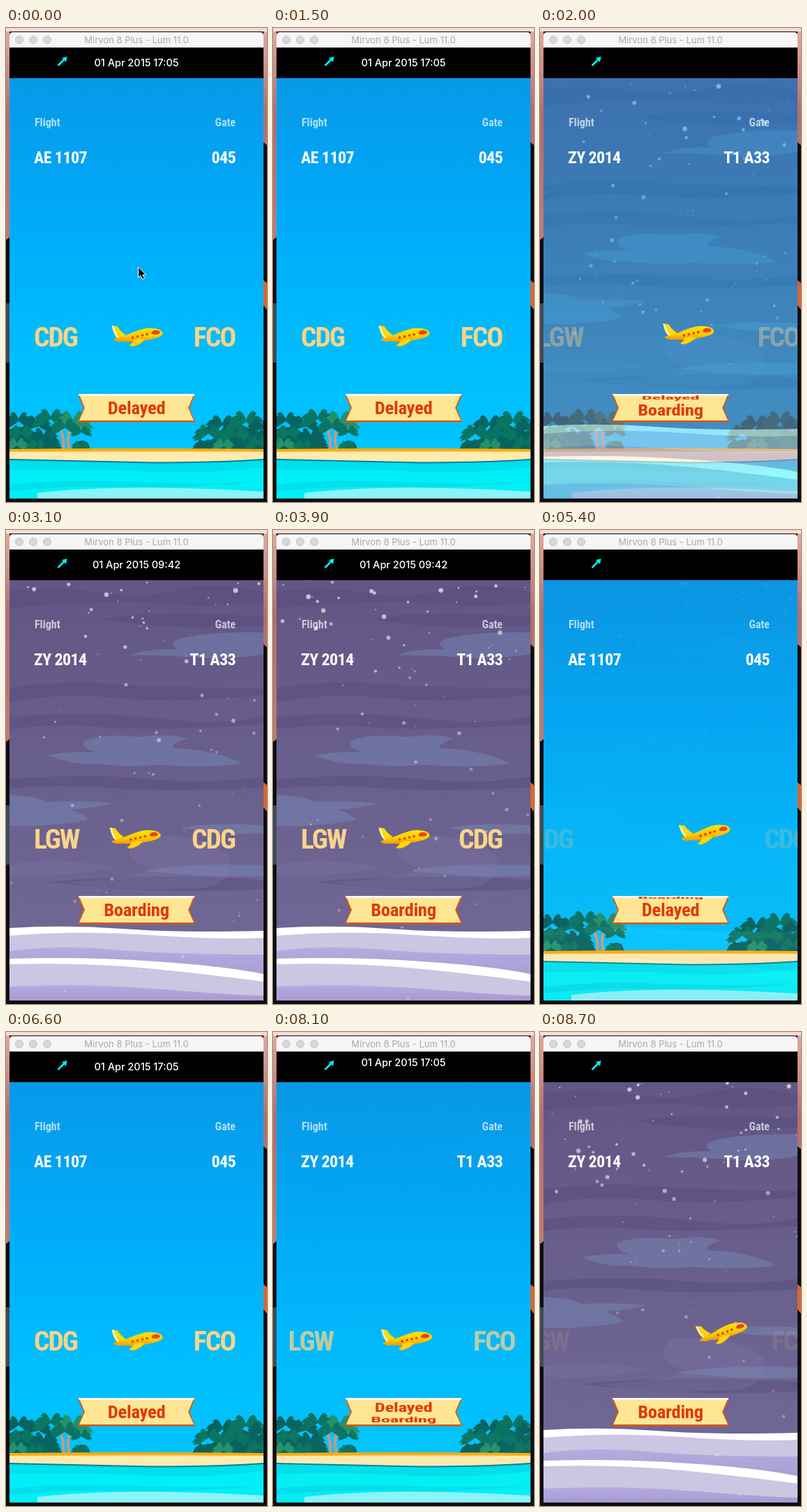
Animation, 374 px wide and 680 px high, one loop 8800 ms. Source, as an HTML page:

```html
<!DOCTYPE html>
<html lang="en">
<head>
<meta charset="utf-8">
<title>Flight status</title>
<style>
  html, body { margin: 0; width: 100%; height: 100%; overflow: hidden; background: #0a0a0e; }
  svg { display: block; width: 374px; height: 680px; }
  text { font-family: "Roboto Condensed", Roboto, "Liberation Sans", sans-serif; font-stretch: 75%; font-weight: 700; }
  .end { text-anchor: end; }
  .caption { font-size: 16px; fill: #fff; fill-opacity: .68; }
  .code { font-size: 24px; letter-spacing: -.6px; fill: #fff; }
  .airport { font-size: 39.500px; letter-spacing: -2px; fill: #fad488; }
  .status { font-size: 26.500px; letter-spacing: -.2px; fill: #e03a06; text-anchor: middle; }
  .clock { font: 500 14.500px Inter, sans-serif; fill: #fff; text-anchor: middle; }
  .title { font: 400 13px Inter, sans-serif; fill: #a9a8ad; text-anchor: middle; }
</style>
</head>
<body>
<svg viewBox="0 0 374 680">
  <defs>
    <linearGradient id="sky" x2="0" y2="1">
      <stop stop-color="#0799e8"/><stop offset=".35" stop-color="#00a9f7"/>
      <stop offset=".7" stop-color="#00bbfe"/><stop offset="1" stop-color="#00c5ff"/>
    </linearGradient>
    <linearGradient id="dusk" x2="0" y2="1">
      <stop stop-color="#625684"/><stop offset=".5" stop-color="#6a608d"/><stop offset="1" stop-color="#736a98"/>
    </linearGradient>
    <linearGradient id="wall" x2="0" y2="1">
      <stop stop-color="#e3aaa2"/><stop offset=".4" stop-color="#b46d6d"/><stop offset="1" stop-color="#c27b70"/>
    </linearGradient>
    <linearGradient id="gold" x2="0" y2="1">
      <stop stop-color="#ffe20c"/><stop offset=".6" stop-color="#ffc900"/><stop offset="1" stop-color="#f39a00"/>
    </linearGradient>
    <linearGradient id="lilac" x2="0" y2="1">
      <stop stop-color="#b5abdf"/><stop offset="1" stop-color="#a79ad0"/>
    </linearGradient>
    <clipPath id="screen"><path d="M5 72h364v603H5z"/></clipPath>
    <clipPath id="bar"><path d="M5 28h364v44H5z"/></clipPath>
  </defs>

  <!-- desktop and window chrome -->
  <path fill="#0c0d13" d="M0 0h374v680H0z"/>
  <path fill="url(#wall)" d="M0 0h5v300l-5 4zM369 0h5v168l-5 -4z"/>
  <path fill="#f9dbd4" d="M0 0h374v5H0z"/>
  <path fill="#3d4a58" d="M0 395h5v85H0z"/>
  <path fill="#d9662f" d="M369 362l5 4v38l-5 -6z"/>
  <path fill="#f6f6f7" d="M5 28V11q0-5 5-5h354q5 0 5 5v17z"/>
  <g fill="#d8d8da" stroke="#c4c4c7"><circle cx="19" cy="17" r="5.5"/><circle cx="39" cy="17" r="5.5"/><circle cx="59" cy="17" r="5.5"/></g>
  <text class="title" x="187" y="22">Mirvon 8 Plus - Lum 11.0</text>

  <g clip-path="url(#screen)">
    <path fill="url(#sky)" d="M5 72h364v535H5z"/>
    <g id="palms"></g>
    <path fill="#ffae0d" d="M5 604q180 -2 364 0v8H5z"/>
    <path fill="#ffebb0" d="M5 608q180 -1 364 0v16H5z"/>
    <path fill="#087f96" d="M5 618q90 2 180 4t184 -4v10H5z"/>
    <path fill="#00dfec" d="M5 620q90 2 180 4t184 -4v55H5z"/>
    <path fill="#00eff6" d="M5 634q110 -3 190 2t174 -6v45H5z"/>
    <path fill="#00dfec" d="M5 655q80 -8 170 -4t194 0q-100 9 -180 7t-184 6z"/>
    <path fill="#8af4fa" d="M45 667q120 -14 324 -2v10H45z"/>

    <g id="winter">
      <path fill="url(#dusk)" d="M5 72h364v603H5z"/>
      <g fill="#554a7b" opacity=".45">
        <path d="M5 88q70 -8 130 2t110 -4 124 4v14q-70 9 -140 2t-224 6zM5 226q90 -14 190 -2l174 4v9q-130 12 -210 4t-154 6z"/>
        <path d="M140 128q60 -14 229 -4v12q-120 10 -229 -8zM5 268q110 -10 210 2t154 -4v13q-160 10 -230 4t-134 3zM5 357q120 -8 200 0t164 -3v15q-130 8 -220 1t-144 2zM60 505q140 -14 309 -3v13q-140 10 -309 -10z"/>
      </g>
      <g fill="#7890bd" opacity=".42">
        <path d="M178 180q20 -10 68 -9q-14 -8 0 -14q38 -12 123 -10v31q-50 9 -98 5t-93 -3z"/>
        <path d="M112 302q30 -11 78 -5 48 -6 68 2q-24 9 -18 14 60 2 99 22q-46 7 -120 2 -60 4 -95 -3 15 -9 38 -11 -60 -4 -50 -21z"/>
        <path d="M60 323q50 -9 110 0 35 4 58 1 -36 14 -90 10 -40 6 -78 -11zM5 380q40 2 54 10 54 -2 94 2 -30 8 -62 9 20 5 28 15 -60 11 -114 8z"/>
        <path d="M195 489q60 -12 174 -8v15q-60 4 -174 -7zM250 427q50 -8 119 -3v11q-60 3 -119 -8z"/>
      </g>
      <path fill="#8a82b0" opacity=".22" d="M190 440q90 -8 130 28 10 36 -36 45 -120 8 -200 -8 100 -4 130 -20 -60 -12 -24 -45zM5 480q70 -12 150 4 -80 16 -150 10z"/>
      <path fill="#fff" d="M5 571q80 -5 160 1t204 3v100H5z"/>
      <path fill="#cbc6e1" d="M5 582q100 -8 200 -1t164 4v90H5z"/>
      <path fill="url(#lilac)" d="M5 604q70 -9 150 -2t214 7v40H5z"/>
      <path fill="#fff" d="M5 615q110 -3 210 4t154 18v38H5z"/>
      <path fill="#cbc6e1" d="M5 623q110 -3 200 6t164 19v27H5z"/>
      <path fill="url(#lilac)" d="M5 655q110 -5 220 4t144 9v7H5z"/>
      <g id="snow" fill="#fff"></g>
    </g>

    <text class="caption" x="41" y="141">Flight</text>
    <text class="caption end" x="329" y="141">Gate</text>
    <text class="code" id="flight" x="40" y="194"></text>
    <text class="code end" id="gate" x="329" y="194"></text>
    <text class="airport" id="departure" x="40" y="457"></text>
    <text class="airport end" id="arrival" x="328" y="457"></text>

    <g id="plane">
      <path fill="#f7a800" d="M-34 6q8 -5 18 -3l-3 5q-8 3 -15 -2z"/>
      <path fill="#ffd90a" d="M-36 -14l8 1q5 8 12 12l-10 6q-6 -3 -10 -19z"/>
      <path fill="#fff3a0" d="M-36 -14l3 .5q3 12 8 17l-2 1q-6 -4 -9 -18.500z"/>
      <path fill="url(#gold)" d="M-27 3C-12 0 2 -10 18 -10.500C30 -10.500 37 -7 37 -3C37 2 25 5 14 7C-2 10 -18 10 -26 7Q-29 5 -27 3z"/>
      <path fill="#e7440d" d="M21 -3.500q1 -4 7 -4 6 1 5 4 -3 3 -9 2 -3 0 -3 -2z"/>
      <g fill="#d9420c"><circle cx="-6" cy="3" r="1.800"/><circle cx="1" cy="1.500" r="1.800"/><circle cx="8" cy="0" r="1.800"/><circle cx="14.500" cy="-1.500" r="1.800"/></g>
      <path fill="#ffd60a" stroke="#f09a00" stroke-width=".7" d="M-5 6q9 -3 17 -1 -5 7 -16 10.500 -5 1 -7 -1 6 -4 6 -8.500z"/>
    </g>

    <path fill="#e0560f" d="M103 526h168l-8 19 8 20.500H103l8 -20.500z"/>
    <path fill="#ffe694" d="M105 526h164l-8 19 8 18H105l8 -18z"/>
    <path fill="#fff" d="M104 525h166v2.500H104z"/>
    <text class="status" id="oldStatus" y="9"></text>
    <text class="status" id="newStatus" y="9"></text>
  </g>

  <path d="M5 28h364v44H5z"/>
  <g stroke="#00eef0" fill="#00eef0"><path stroke-width="2.600" d="M74.500 54L84 44.500"/><path stroke="none" d="M80 43l7.500 -2 -1.500 8z"/></g>
  <g clip-path="url(#bar)"><text class="clock" id="clock" x="187"></text></g>
  <path id="cursor" stroke="#fff" d="M189.500 343v15l3.500 -3 2.500 5.500 2.800 -1.300 -2.500 -5.200h4.700z"/>
</svg>
<script>
const LOOP = 8800;
const PX = 364 / 414; // screen points to pixels
const el = Object.fromEntries([...document.querySelectorAll('[id]')].map(e => [e.id, e]));

const beach = { flight: 'AE 1107', gate: '045', from: 'CDG', to: 'FCO', status: 'Delayed', clock: '01 Apr 2015 17:05', winter: 0 };
const snowy = { flight: 'ZY 2014', gate: 'T1 A33', from: 'LGW', to: 'CDG', status: 'Boarding', clock: '01 Apr 2015 09:42', winter: 1 };
const changes = [
  { at: -9000, rate: 1, before: snowy, after: beach },
  { at: 1690, rate: 1, before: beach, after: snowy },
  { at: 4970, rate: 1, before: snowy, after: beach },
  { at: 7925, rate: .68, before: beach, after: snowy }
];

const clamp = v => Math.min(1, Math.max(0, v));
const span = (p, start, length) => clamp((p - start) / length);
const mix = (a, b, k) => a + (b - a) * k;

// CSS-style easing with control points (x1, 0) and (x2, 1)
function bezier(x1, x2) {
  return v => {
    v = clamp(v);
    let low = 0, high = 1;
    for (let i = 0; i < 20; i++) {
      const s = (low + high) / 2, r = 1 - s;
      if (3 * x1 * s * r * r + 3 * x2 * s * s * r + s ** 3 < v) low = s; else high = s;
    }
    return low * low * (3 - 2 * low);
  };
}
const easeInOut = bezier(.42, .58), easeOut = bezier(0, .58);

let seed = 11;
const random = () => (seed = seed * 16807 % 2147483647) / 2147483647;

function add(parent, tag, attributes) {
  const node = document.createElementNS('http://www.w3.org/2000/svg', tag);
  for (const name in attributes) node.setAttribute(name, attributes[name]);
  return parent.appendChild(node);
}

function palm(x, y, size, color) {
  let d = '';
  for (const degrees of [-205, -180, -150, -120, -60, -30, 0, 25]) {
    const a = degrees * Math.PI / 180, c = Math.cos(a), s = Math.sin(a);
    const tipX = x + size * c, tipY = y + size * (.45 * s + .45 * c * c);
    const midX = x + size * .55 * c, midY = y + size * .5 * s;
    d += `M${x} ${y}Q${midX} ${midY - size * .22} ${tipX} ${tipY}Q${midX} ${midY + size * .35} ${x} ${y + 3}z`;
  }
  add(el.palms, 'path', { d, fill: color });
}
const dark = '#07635f', green = '#0a7561', light = '#23926c';

// undergrowth and trunks, then crowns from back to front
add(el.palms, 'path', { fill: dark, d: 'M5 605V576q14 -8 30 2t32 4q8 10 10 23zM96 605q4 -14 14 -13t10 13zM267 605q4 -14 18 -13t24 -16 34 -4 26 0v33z' });
add(el.palms, 'path', { stroke: '#c69a80', 'stroke-width': 4, fill: 'none', d: 'M94 568q-8 16 -3 37M76 572q8 14 6 33' });
[
  [18, 561, 24, dark], [44, 566, 24, dark], [64, 558, 28, green], [96, 562, 30, light], [84, 570, 24, green],
  [22, 580, 24, green], [54, 584, 24, dark], [108, 577, 16, green],
  [310, 567, 28, dark], [344, 562, 30, green], [366, 570, 24, dark], [290, 579, 24, green], [328, 581, 26, green],
  [16, 596, 18, light], [44, 597, 17, green], [66, 597, 15, dark], [106, 598, 14, green],
  [284, 597, 17, dark], [312, 597, 19, light], [340, 596, 18, dark], [362, 594, 20, green]
].forEach(p => palm(...p));

const flakes = Array.from({ length: 95 }, () => {
  const size = .6 + 3 * random() ** 1.6;
  return {
    x: 5 + 364 * random(), birth: 4 * random(), size,
    vx: 50 * (random() - .5), vy: 20 + 90 * random(),
    node: add(el.snow, 'circle', { stroke: '#fff', 'stroke-opacity': .25, 'stroke-width': 1.5 })
  };
});

function drawSnow(seconds) {
  for (const f of flakes) {
    const age = (seconds + f.birth) % 4;
    f.node.setAttribute('cx', f.x + f.vx * age + 4 * age * age);
    f.node.setAttribute('cy', 66 + f.vy * age + 18 * age * age);
    f.node.setAttribute('r', Math.max(.4, f.size * (1 - .1 * age)));
    f.node.setAttribute('opacity', .7 - .12 * age);
  }
}

function drawPlane(s) {
  const p = easeInOut(s / 1.5);
  const roll = span(p, 0, .25), climb = span(p, .25, .25), land = span(p, .55, .45);
  const gone = p >= .51;
  const x = gone ? mix(5, 187.5, land) : 187.5 + PX * (80 * roll + 100 * climb);
  const y = gone ? 441 : 441 - PX * (10 * roll + 50 * climb);
  const angle = gone ? 0 : -22.5 * span(p, .1, .4);
  el.plane.setAttribute('transform', `translate(${x} ${y}) rotate(${angle})`);
  el.plane.setAttribute('opacity', gone ? land : 1 - climb);
}

function drawStatus(node, text, shift, scale) {
  node.textContent = text;
  node.setAttribute('transform', `translate(187 ${545 + shift}) scale(1 ${scale})`);
  node.setAttribute('visibility', scale > .101 ? 'visible' : 'hidden');
}

function drawLabels(s, before, after) {
  const turn = .72;
  const away = s < turn ? easeOut(s / turn) : 1 - easeOut((s - turn) / .5);
  el.departure.textContent = after.from;
  el.arrival.textContent = s < turn ? before.to : after.to;
  el.departure.setAttribute('transform', `translate(${-80 * PX * away})`);
  el.arrival.setAttribute('transform', `translate(${80 * PX * away})`);
  for (const label of [el.departure, el.arrival]) label.setAttribute('opacity', 1 - away);
}

function draw(t) {
  const { at, rate, before, after } = changes.findLast(c => c.at <= t);
  const s = (t - at) / 1000 * rate;

  el.winter.setAttribute('opacity', mix(before.winter, after.winter, easeInOut(span(s, .08, .42))));
  drawSnow(t / 1000);
  el.flight.textContent = after.flight;
  el.gate.textContent = after.gate;
  drawLabels(s, before, after);
  drawPlane(s);

  const flip = easeOut(s / .5);
  drawStatus(el.oldStatus, before.status, -18 * flip, 1 - .9 * flip);
  drawStatus(el.newStatus, after.status, 18 * (1 - flip), .1 + .9 * flip);

  const p = easeInOut(s);
  el.clock.textContent = (s < .5 ? before : after).clock;
  el.clock.setAttribute('y', 55 - 100 * PX * (span(p, 0, .45) - span(p, .5, .45)));
  el.cursor.setAttribute('visibility', t < 500 ? 'visible' : 'hidden');
}

const start = performance.now();
function frame() {
  draw((performance.now() - start) % LOOP);
  requestAnimationFrame(frame);
}
frame();
</script>
</body>
</html>
```
